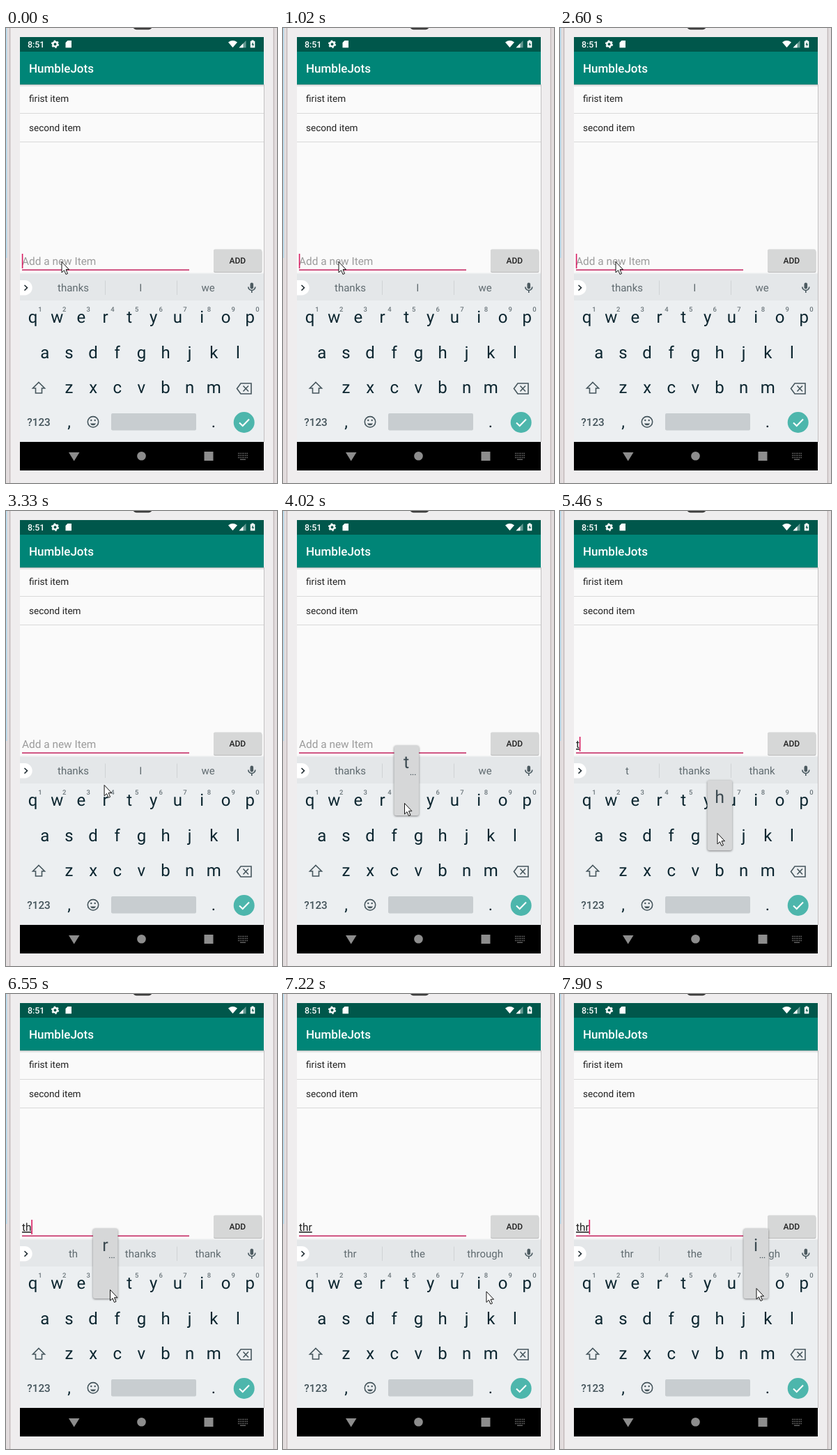
These frames come from a looping animation (389x653 px, 8 s). An HTML page:

```html
<!DOCTYPE html>
<html lang="en">
<head>
<meta charset="utf-8">
<title>Todo typing</title>
<style>
  html, body { margin: 0; width: 100%; height: 100%; overflow: hidden; background: #eeebec; }
  svg { display: block; width: 389px; height: 653px; font-family: Roboto, sans-serif; text-rendering: geometricPrecision; }
  .mid { text-anchor: middle; }
  .medium { font-weight: 500; }
  .item { font-size: 13.6px; fill: #212121; }
  .input { font-size: 15.4px; }
  .word { font-size: 15px; fill: #606b70; }
  .key { font-size: 24px; fill: #0c2630; }
  .digit { font-size: 9.5px; fill: #6b767b; }
  .icon { fill: none; stroke: #46565d; stroke-width: 1.6; }
  #typed { text-decoration: underline; }
  #popup rect { filter: drop-shadow(0 1px 1.5px #0007); }
</style>
</head>
<body>
<svg viewBox="0 0 389 653">
  <!-- device frame -->
  <path d="M0 0H389V653H0z" fill="#e2dcdd"/>
  <path d="M0 0H1.5V330H0z" fill="#b4d9ee"/>
  <path d="M5.5 0V653M384.5 0V653" stroke="#bfb6b8"/>
  <path d="M7 0H383V653H7z" fill="#efedee"/>
  <rect x="183" y="-10" width="26" height="11.5" rx="4" fill="#555" stroke="#2b2b2b" stroke-width="1.5"/>

  <!-- app -->
  <path d="M20 13H370V635H20z" fill="#fafafa"/>
  <path d="M20 81H370V82H20z" fill="#b4baba"/>
  <path d="M20 82H370V84H20z" fill="#e6e8e8"/>
  <path d="M20 13H370V34H20z" fill="#00574b"/>
  <path d="M20 34H370V81H20z" fill="#008577"/>
  <text class="medium" x="31" y="27.7" font-size="12.4" fill="#fff">8:51</text>
  <g fill="#fff">
    <circle cx="70.5" cy="23.2" r="3.2" fill="none" stroke="#fff" stroke-width="2.4"/>
    <circle cx="70.5" cy="23.2" r="4.8" fill="none" stroke="#fff" stroke-width="1.6" stroke-dasharray="2.5 2.527"/>
    <path d="M88.5 18H94V28.3H85.5V21z"/>
    <path d="M319 20.5Q325.5 15.7 332 20.5L325.5 28z"/>
    <path d="M344.5 18V28.3H334.5z" opacity=".4"/>
    <path d="M340.5 22V28.3H334.5z"/>
    <path d="M352.5 17.5H355.5V18.7H357.3V28.3H350.8V18.7H352.5z"/>
  </g>
  <path d="M354.7 20L352.5 24H354V27L356 23H354.7z" fill="#00574b"/>
  <text class="medium" x="33" y="63.5" font-size="17" fill="#fff">HumbleJots</text>
  <text class="item" x="33" y="106.3">firist item</text>
  <text class="item" x="33" y="148">second item</text>
  <path d="M20 122.5H370M20 163.5H370" stroke="#d9d9d9"/>

  <text id="hint" class="input" x="23" y="340" fill="#9b9b9b">Add a new Item</text>
  <text id="typed" class="input" x="23" y="340" fill="#212121"></text>
  <path d="M23 347.3H263" stroke="#c4235f" stroke-width="1.5"/>
  <path id="caret" d="M0 324V345" stroke="#d81b60" stroke-width="1.6"/>
  <rect x="298" y="319" width="69.5" height="32" rx="2" fill="#bbb"/>
  <rect x="298" y="317.5" width="69" height="32.5" rx="2" fill="#d6d7d7"/>
  <text class="mid medium" x="332.3" y="338.2" font-size="12" fill="#212121">ADD</text>

  <!-- keyboard -->
  <path d="M20 351.5H370V354H20z" fill="#eceeef"/>
  <path d="M20 353H370V391H20z" fill="#e4e7e9"/>
  <path d="M20 391H370V594H20z" fill="#eceff1"/>
  <path d="M20 362H27A10.7 10.7 0 0 1 27 383.4H20z" fill="#fff"/>
  <path d="M26.5 369L30.5 372.8L26.5 376.6" class="icon" style="stroke:#263238"/>
  <path d="M142.5 362.5V383M245.5 362.5V383" stroke="#cfd3d5"/>
  <rect x="350.5" y="365.5" width="4.6" height="9" rx="2.3" fill="#4d5b61"/>
  <path class="icon" d="M347.8 371.5A5 5 0 0 0 357.8 371.5M352.8 376.5V380"/>
  <g id="words"></g>
  <g id="keys"></g>
  <path class="icon" d="M47 508.5L55.5 517H51.5V524H42.5V517H38.5z"/>
  <path class="icon" d="M337 510H352V525H337L331.5 517.5zM340.5 513.5L348 521.5M348 513.5L340.5 521.5"/>
  <text class="mid medium" x="47" y="570.8" font-size="15.3" fill="#44545b">?123</text>
  <circle class="icon" cx="125" cy="565.3" r="7.7"/>
  <path d="M120.8 567.5A4.6 4.6 0 0 0 129.2 567.5z" fill="#46565d"/>
  <circle cx="122.3" cy="563" r="1.2" fill="#46565d"/>
  <circle cx="127.7" cy="563" r="1.2" fill="#46565d"/>
  <rect x="151" y="553" width="122" height="24.5" rx="2" fill="#c8cdd0"/>
  <circle cx="341.7" cy="566" r="15" fill="#4db6ac"/>
  <path d="M335 566.5L339.7 571L349 561.5" fill="none" stroke="#fff" stroke-width="2"/>

  <!-- navigation bar -->
  <path d="M20 594H370V635H20z"/>
  <path d="M370.5 81V594" stroke="#c3c0c1"/>
  <g fill="#8d8d8d">
    <path d="M90 609H105.5L97.7 621.5z"/>
    <circle cx="194.5" cy="614.3" r="6.3"/>
    <path d="M284.5 608H297.5V621H284.5z"/>
  </g>
  <path d="M333 610.5H347M333 613.5H347M333 616.5H347" stroke="#6a6a6a" stroke-width="1.5" stroke-dasharray="1.5 1"/>
  <path d="M336 619.3H344" stroke="#6a6a6a" stroke-width="1.3"/>

  <g id="popup">
    <rect x="-17.5" width="35.5" height="100.5" rx="3" fill="#d6d7d8"/>
    <text id="popKey" class="mid" y="32.7" font-size="25" fill="#3d4b52"></text>
    <text id="popDots" class="medium mid" x="9.5" y="42.3" font-size="11" fill="#3d4b52">...</text>
  </g>
  <path id="mouse" d="M.5 .5V16L4 12.7L6.5 18.5L9 17.4L6.5 11.7H11z" fill="#fff" stroke="#111" stroke-linejoin="round"/>
</svg>
<script>
const LOOP = 8000, BLINK = 480, PITCH = 34.65, ROW = 50.2;
const el = id => document.getElementById(id);
const svgText = (parent, cls, x, y, str) => {
  const t = document.createElementNS('http://www.w3.org/2000/svg', 'text');
  t.setAttribute('class', cls);
  t.setAttribute('x', x);
  t.setAttribute('y', y);
  t.textContent = str;
  return parent.appendChild(t);
};

const keyAt = {};
['qwertyuiop', ' asdfghjkl', '  zxcvbnm,'].forEach((row, r) => {
  [...row].forEach((ch, i) => {
    if (ch === ' ' || ch === ',') return;
    // the two lower rows sit half a key to the left of the top row's grid
    const x = 38.5 + (i - (r ? 0.5 : 0)) * PITCH, y = 423.4 + r * ROW;
    keyAt[ch] = { x, y, dots: r === 0 };
    svgText(el('keys'), 'key mid', x, y, ch);
    if (r === 0) svgText(el('keys'), 'digit mid medium', x + 10.5, 407, (i + 1) % 10);
  });
});
svgText(el('keys'), 'key mid', 90.5, 573, ',');
svgText(el('keys'), 'key mid', 298, 573, '.');
const words = [0, 1, 2].map(i => svgText(el('words'), 'word mid', 96.5 + i * 96.8, 378.4, ''));

// a key shows its popup while down; its letter and suggestions arrive on release
const strokes = [
  { key: 't', down: 4020, up: 4300, list: 't thanks thank' },
  { key: 'h', down: 5460, up: 5580, list: 'th thanks thank' },
  { key: 'r', down: 6550, up: 6680, list: 'thr the through' },
  { key: 'i', down: 7900, up: LOOP }
];
const idle = { up: -330, list: 'thanks I we' };

const home = { x: 79.5, y: 335 };
const moves = [
  { from: 2780, to: 3700, x: 174, y: 419, dip: 4 },
  { from: 4300, to: 4870, x: 225.5, y: 462, dip: 4 },
  { from: 5580, to: 6120, x: 149, y: 424, dip: 0 },
  { from: 6680, to: 7220, x: 291.5, y: 426.5, dip: 24 },
  { from: 7220, to: 7620, x: 281.5, y: 422, dip: 0 }
];
const ease = p => p * p * (3 - 2 * p);
const show = (id, on) => { el(id).style.display = on ? '' : 'none'; };
const place = (id, x, y) => el(id).setAttribute('transform', `translate(${x} ${y})`);

function pointerAt(t) {
  let { x, y } = home;
  for (const m of moves) {
    const p = ease(Math.min(1, Math.max(0, (t - m.from) / (m.to - m.from))));
    x += (m.x - x) * p;
    y += (m.y - y) * p + m.dip * Math.sin(Math.PI * p);
  }
  return [x, y];
}

function draw(t) {
  const done = strokes.filter(s => t >= s.up);
  const last = done.at(-1) || idle;
  el('typed').textContent = done.map(s => s.key).join('');
  show('hint', !done.length);
  last.list.split(' ').forEach((w, i) => { words[i].textContent = w; });

  place('caret', 23.6 + el('typed').getComputedTextLength(), 0);
  show('caret', Math.floor((t - last.up) / BLINK) % 2 === 0);

  const held = strokes.find(s => t >= s.down && t < s.up);
  show('popup', held);
  if (held) {
    const { x, y, dots } = keyAt[held.key];
    el('popKey').textContent = held.key;
    show('popDots', dots);
    place('popup', x, y - 87);
  }
  place('mouse', ...pointerAt(t));
}

const start = performance.now();
function tick() {
  draw((performance.now() - start) % LOOP);
  requestAnimationFrame(tick);
}
tick();
</script>
</body>
</html>
```
